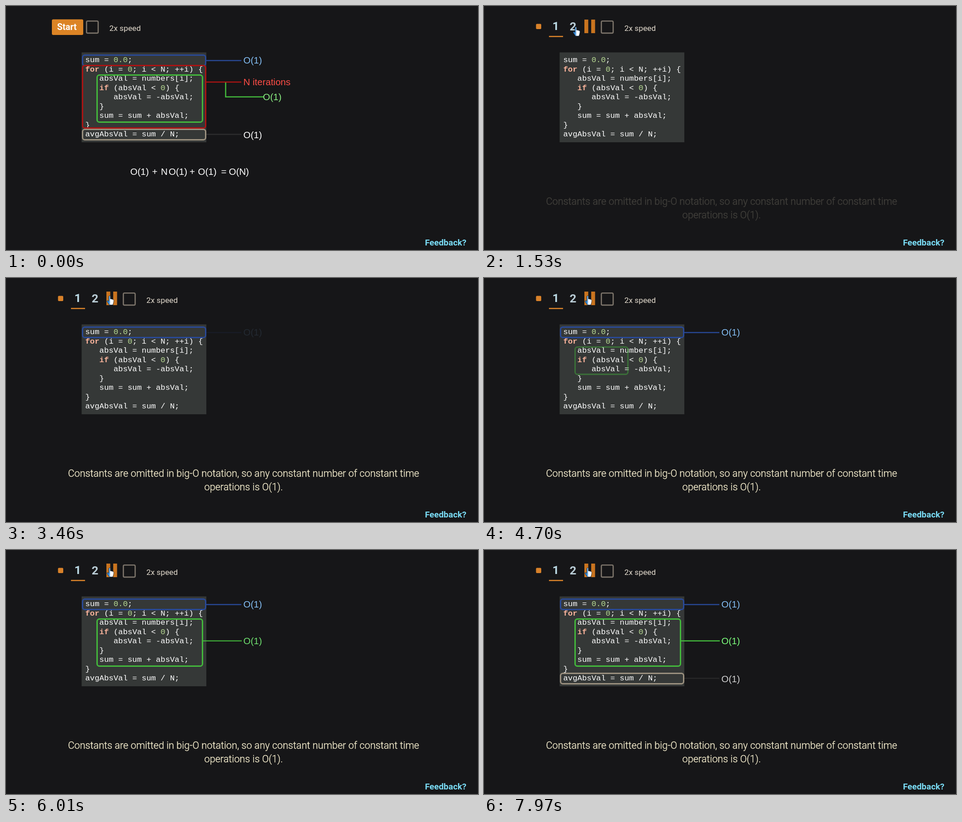
An HTML page for the animation above (8 s loop, 1039 by 539 pixels).

```html
<!DOCTYPE html>
<html lang="en">
<head>
<meta charset="utf-8">
<title>Runtime complexity</title>
<style>
  html, body { margin: 0; width: 100%; height: 100%; overflow: hidden; background: #161618; }
  svg { display: block; width: 1039px; height: 539px; }
  svg * { animation-duration: 8s; animation-iteration-count: infinite; }

  text { font-family: Roboto, sans-serif; fill: #fff; }
  .bold { font-weight: 700; }
  .speed { font-weight: 400; font-size: 17.27px; fill: #e2dacd; }
  .step { font-weight: 700; font-size: 25.9px; fill: #b9ccd5; text-anchor: middle; }
  .caption { font-weight: 300; font-size: 21.68px; fill: #f7efcf; stroke: #f7efcf; stroke-width: .35; text-anchor: middle; }
  .code text { font: 17.27px "Liberation Mono", monospace; white-space: pre; fill: #fff; }
  .code .key { font-weight: 700; fill: #fbb49c; }
  .code .num { fill: #b9dc94; }
  .math text { font: 20.5px "Liberation Sans", Arial, sans-serif; }

  .frame, .link { fill: none; stroke-width: 3; }
  .link { stroke-width: 2.6; }
  .blue { stroke: #294996; }
  .red { stroke: #ab1313; }
  .green { stroke: #43b93c; }
  .gray { stroke: #9b907f; }
  .faint { stroke: #2c2c2e; }
  .orange { fill: #d9822a; }
  .pause { fill: #c9741f; }
  .check { fill: none; stroke: #7d756b; stroke-width: 2.6; }

  /* Hard switch between the idle and the running view */
  .idle { animation-name: idle; animation-timing-function: step-end; }
  .running { animation-name: running; animation-timing-function: step-end; }
  @keyframes idle { 0% { visibility: visible } 15.5%, 100% { visibility: hidden } }
  @keyframes running { 0% { visibility: hidden } 15.5%, 100% { visibility: visible } }

  .ease { animation-timing-function: cubic-bezier(.37, 0, .63, 1); }
  .caption { animation-name: caption; }
  .box1 { animation-name: box1; }
  .box2 { animation-name: box2; }
  .box3 { animation-name: box3; }
  .label1 { animation-name: label1; }
  .label2 { animation-name: label2; }
  .label3 { animation-name: label3; }
  @keyframes caption { 0%, 15.5% { opacity: 0 } 28%, 100% { opacity: 1 } }
  @keyframes box1 {
    0%, 28% { width: 26px; height: 23px; opacity: 0 }
    40.5%, 100% { width: 271px; height: 23px; opacity: 1 }
  }
  @keyframes box2 {
    0%, 53% { width: 26px; height: 26px; opacity: 0 }
    65.5%, 100% { width: 232px; height: 104px; opacity: 1 }
  }
  @keyframes box3 {
    0%, 78.25% { width: 26px; height: 23px; opacity: 0 }
    90.75%, 100% { width: 271px; height: 23px; opacity: 1 }
  }
  @keyframes label1 { 0%, 40.5% { opacity: 0 } 53%, 100% { opacity: 1 } }
  @keyframes label2 { 0%, 65.5% { opacity: 0 } 78%, 100% { opacity: 1 } }
  /* The loop ends before this fade is complete */
  @keyframes label3 {
    0% { opacity: 0 }
    90.75% { opacity: 0; animation-timing-function: cubic-bezier(.12, 0, .39, 0) }
    97% { opacity: .5; animation-timing-function: cubic-bezier(.33, .38, .66, .73) }
    100% { opacity: .84 }
  }

  .start { fill: #dc8425; animation-name: hover; animation-timing-function: step-end; }
  @keyframes hover { 0% { fill: #dc8425 } 11.375%, 100% { fill: #c7691d } }

  .pointer { animation-name: travel; animation-timing-function: linear; }
  @keyframes travel {
    0%, .875% { transform: translate(1000px, 532px) }
    2.9% { transform: translate(935px, 518px) }
    4% { transform: translate(868px, 490px) }
    6.4% { transform: translate(565px, 220px) }
    8.6% { transform: translate(320px, 63px) }
    10.375% { transform: translate(175px, 43px) }
    11.375%, 16.5% { transform: translate(163px, 42px) }
    19% { transform: translate(200px, 46px) }
    22%, 27.2% { transform: translate(242px, 43px) }
    28.2%, 100% { transform: translate(228px, 39px) }
  }
  .arrow, .hand, .click { animation-timing-function: step-end; }
  .arrow { animation-name: arrow; }
  .hand { animation-name: hand; }
  .click { animation-name: click; }
  @keyframes arrow { 0% { opacity: 0 } .875% { opacity: 1 } 11.375%, 100% { opacity: 0 } }
  @keyframes hand { 0% { opacity: 0 } 11.375%, 100% { opacity: 1 } }
  @keyframes click { 0% { opacity: 0 } 13.4% { opacity: .88 } 15.5%, 100% { opacity: 0 } }
</style>
</head>
<body>
<svg viewBox="0 0 1039 539">
  <defs>
    <linearGradient id="glove">
      <stop offset=".3" stop-color="#3288d6"/>
      <stop offset=".55" stop-color="#fff"/>
    </linearGradient>
  </defs>

  <g class="idle">
    <rect class="start" x="101" y="29.5" width="69" height="34.5" rx="3"/>
    <text class="bold" x="112.5" y="53" font-size="19.42">Start</text>
    <rect class="check" x="177.3" y="33.3" width="25.6" height="26.6" rx="2.5"/>
    <text class="speed" x="227.5" y="55">2x speed</text>
  </g>

  <g class="running">
    <rect class="orange" x="114.5" y="39.5" width="11.5" height="11.5" rx="2"/>
    <text class="step" x="158" y="52.7" style="fill:#bcdbe6">1</text>
    <text class="step" x="196" y="53.5">2</text>
    <rect class="orange" x="143" y="66" width="31" height="2.6"/>
    <rect class="pause" x="221" y="30" width="8.5" height="30"/>
    <rect class="pause" x="236" y="30" width="8.5" height="30"/>
    <rect class="check" x="258.3" y="33.3" width="26" height="26.6" rx="2.5"/>
    <text class="speed" x="309" y="55">2x speed</text>
  </g>

  <g class="code">
    <rect x="166.5" y="102.5" width="274.5" height="198.5" fill="#353837"/>
    <text x="174.5" y="124">sum = <tspan class="num">0.0</tspan>;</text>
    <text x="174.5" y="144.5"><tspan class="key">for</tspan> (i = <tspan class="num">0</tspan>; i &lt; N; ++i) {</text>
    <text x="174.5" y="165">   absVal = numbers[i];</text>
    <text x="174.5" y="185.5">   <tspan class="key">if</tspan> (absVal &lt; <tspan class="num">0</tspan>) {</text>
    <text x="174.5" y="206">      absVal = -absVal;</text>
    <text x="174.5" y="226.5">   }</text>
    <text x="174.5" y="247">   sum = sum + absVal;</text>
    <text x="174.5" y="267.5">}</text>
    <text x="174.5" y="288">avgAbsVal = sum / N;</text>
  </g>

  <g class="idle math">
    <rect class="frame blue" x="168.5" y="108.5" width="271" height="23" rx="5"/>
    <rect class="frame red" x="168.5" y="131.5" width="271" height="138" rx="5"/>
    <rect class="frame green" x="200.5" y="152.5" width="232" height="104" rx="5"/>
    <rect class="frame gray" x="168.5" y="272.5" width="271" height="23" rx="5"/>
    <path class="link blue" d="M441 120.5H518"/>
    <path class="link red" d="M441 168H518"/>
    <path class="link green" d="M483.5 169V200.8H567"/>
    <path class="link faint" d="M441 283.5H518"/>
    <text x="522.5" y="127.3" style="fill:#85c0f6">O(1)</text>
    <text x="522.5" y="175" style="fill:#ff4d46">N iterations</text>
    <text x="565.5" y="208" style="fill:#8bf083">O(1)</text>
    <text x="522.5" y="292">O(1)</text>
    <text y="372.5"><tspan x="273.5">O(1)</tspan><tspan x="321.5">+</tspan><tspan x="341">N</tspan><tspan x="358">O(1)</tspan><tspan x="404">+</tspan><tspan x="422.5">O(1)</tspan><tspan x="473.5">=</tspan><tspan x="490.5">O(N)</tspan></text>
  </g>

  <g class="running math">
    <rect class="frame blue ease box1" x="168.5" y="108.5" rx="5"/>
    <g class="ease label1">
      <path class="link blue" d="M441 120.5H518"/>
      <text x="522.5" y="127.3" style="fill:#85c0f6">O(1)</text>
    </g>
    <rect class="frame green ease box2" x="200.5" y="152.5" rx="5"/>
    <g class="ease label2">
      <path class="link green" d="M434 200.8H519"/>
      <text x="522.5" y="208" style="fill:#7dff7d">O(1)</text>
    </g>
    <rect class="frame gray ease box3" x="168.5" y="272.5" rx="5"/>
    <g class="label3">
      <path class="link faint" d="M441 283.5H518"/>
      <text x="522.5" y="292">O(1)</text>
    </g>
  </g>

  <g class="running">
    <text class="caption ease" x="523" y="439">Constants are omitted in big-O notation, so any constant number of constant time</text>
    <text class="caption ease" x="523" y="469.3">operations is O(1).</text>
  </g>

  <text class="bold" x="1013.5" y="528.7" font-size="18.9" text-anchor="end" style="fill:#7adcf5">Feedback?</text>

  <g class="pointer">
    <circle class="click" r="11" cy="1" fill="#f0c010"/>
    <path class="arrow" d="M0 0V17L4 13.5 6.7 19.5 9.3 18.4 6.7 12.6H12Z" fill="#fff" stroke="#222"/>
    <path class="hand" d="M-1.8 1.5Q0-1.5 1.8 1.5V7L7 8.2Q9.5 8.8 9.3 11.5L8.6 15.5 7 20.5H-.5L-5.6 13Q-6.2 10-3.6 11L-1.8 12.5Z" fill="url(#glove)" stroke="#14283c" stroke-width=".8"/>
  </g>
</svg>
</body>
</html>
```
